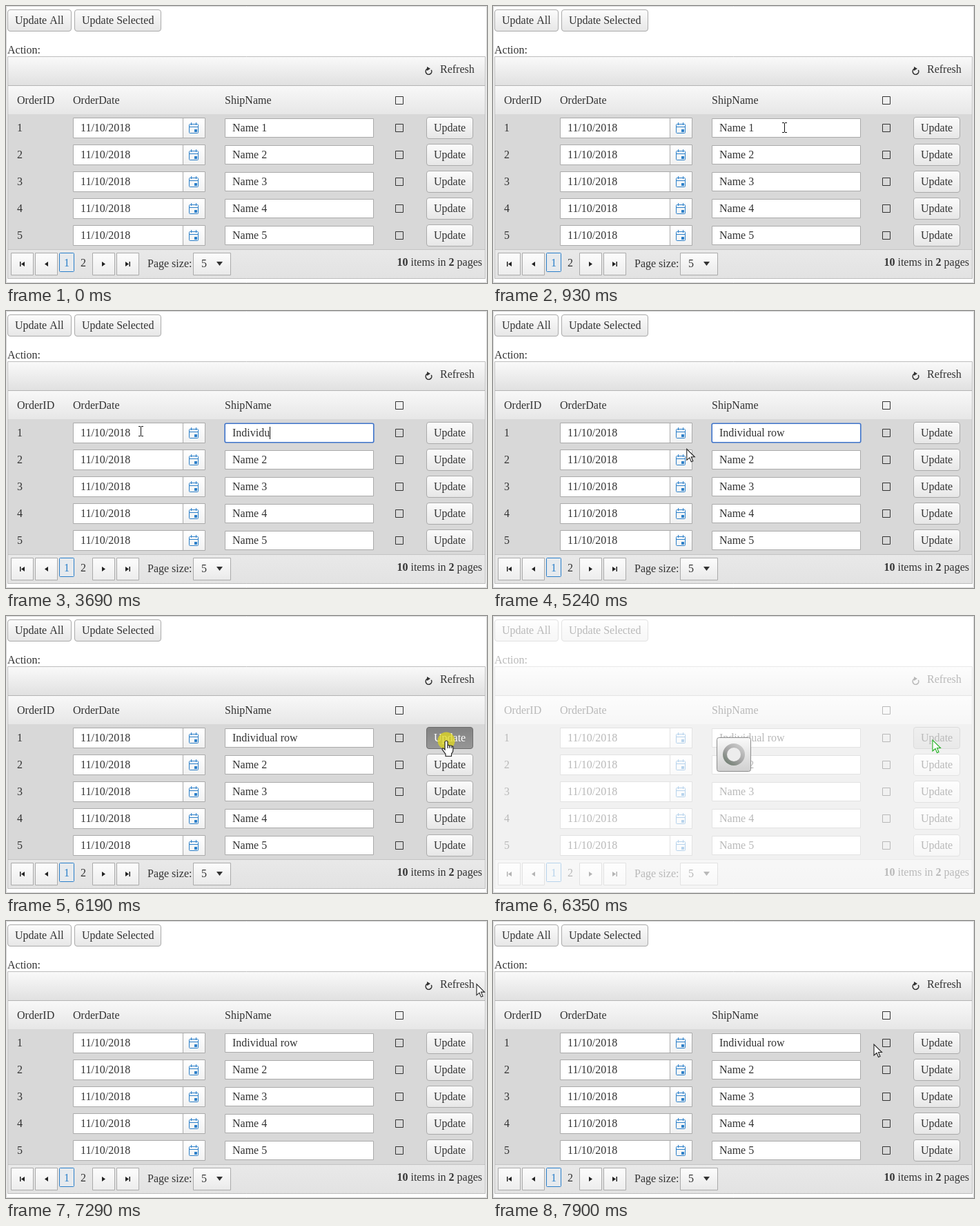
Recreate the animation shown at these times as an HTML page with a canvas. Size 697 by 402 pixels, loop 8000 ms.

```html
<!DOCTYPE html>
<html lang="en">
<head>
<meta charset="utf-8">
<title>Order grid</title>
<style>
html, body { margin: 0; width: 100%; height: 100%; overflow: hidden; background: #fff; }
canvas { display: block; width: 697px; height: 402px; }
</style>
</head>
<body>
<canvas id="stage" width="697" height="402"></canvas>
<script>
const ctx = document.getElementById('stage').getContext('2d');
const LOOP = 8000;
const INK = '#333', LINE = '#aaa', BLUE = '#2b7fc9';
const FONT = '16px "Liberation Serif", "Times New Roman", serif';
const ROW_H = 39, ROW_Y = 177;
const PHRASE = 'Individual row';

// Pointer moves: start, step length, step count, cubic path
const MOVES = [
  [140, 157, 7, [560, 402, 540, 300, 440, 150, 418, 179]],
  [1380, 160, 2, [418, 179, 340, 180, 270, 180, 194, 180]],
  [1690, 150, 1, [194, 180, 194, 178, 195, 176, 195, 174]],
  [5090, 158, 7, [195, 174, 330, 235, 520, 205, 638, 181]],
  [6960, 157, 7, [638, 181, 750, 80, 640, 20, 552, 179]]
];
const KEYS = [[2480, 152, 7], [3540, 150, 4], [4330, 150, 3]];

function stepsDone(t, start, gap, count) {
  return Math.max(0, Math.min(count, Math.floor((t - start + 8) / gap) + 1));
}

function pointer(t) {
  let pos = null;
  for (const [start, gap, count, p] of MOVES) {
    const k = stepsDone(t, start, gap, count);
    if (!k) break;
    const s = k / count, u = s * s * (3 - 2 * s), v = 1 - u;
    const at = i => v * v * v * p[i] + 3 * v * v * u * p[i + 2] + 3 * v * u * u * p[i + 4] + u * u * u * p[i + 6];
    pos = { x: at(0), y: at(1) };
  }
  return pos;
}

function typedText(t) {
  const n = KEYS.reduce((sum, k) => sum + stepsDone(t, ...k), 0);
  if (!n) return 'Name 1';
  return PHRASE.slice(0, n < 11 ? n - 1 : n);
}

function inside(p, x, y, w, h) {
  return p && p.x >= x && p.x < x + w && p.y >= y && p.y < y + h;
}

function text(s, x, y, color = INK, font = FONT) {
  ctx.font = font;
  ctx.fillStyle = color;
  ctx.fillText(s, x, y);
}

function fade(y, h, top, bottom) {
  const g = ctx.createLinearGradient(0, y, 0, y + h);
  g.addColorStop(0, top);
  g.addColorStop(1, bottom);
  return g;
}

function box(x, y, w, h, fill, stroke = LINE, r = 0) {
  ctx.beginPath();
  ctx.roundRect(x + .5, y + .5, w - 1, h - 1, r);
  if (fill) { ctx.fillStyle = fill; ctx.fill(); }
  ctx.lineWidth = 1;
  ctx.strokeStyle = stroke;
  ctx.stroke();
}

function rect(x, y, w, h, fill) {
  ctx.fillStyle = fill;
  ctx.fillRect(x, y, w, h);
}

function poly(points, fill, stroke, width = 1) {
  ctx.beginPath();
  for (let i = 0; i < points.length; i += 2) ctx.lineTo(points[i], points[i + 1]);
  ctx.closePath();
  ctx.fillStyle = fill;
  ctx.fill();
  if (stroke) {
    ctx.lineWidth = width;
    ctx.strokeStyle = stroke;
    ctx.stroke();
  }
}

function disc(x, y, r, fill) {
  ctx.beginPath();
  ctx.arc(x, y, r, 0, 7);
  ctx.fillStyle = fill;
  ctx.fill();
}

const LOOKS = {
  normal: ['#fcfcfc', '#e6e6e6', LINE, INK],
  hover: ['#d2d2d2', '#bebebe', '#999', INK],
  down: ['#828282', '#979797', '#6c6c6c', '#fff']
};

function button(label, x, y, w, look = 'normal') {
  const [top, bottom, edge, ink] = LOOKS[look];
  box(x, y, w, 32, fade(y, 32, top, bottom), edge, 3.5);
  text(label, x + 11, y + 21, ink);
}

function checkbox(y) {
  box(564, y - 6, 12, 12, null, '#333');
}

function calendar(x, y) {
  box(x, y + 2, 14, 14, null, BLUE, 1);
  rect(x, y + 6, 14, 1, BLUE);
  rect(x + 3, y, 1, 4, BLUE);
  rect(x + 10, y, 1, 4, BLUE);
  rect(x + 8, y + 10, 4, 4, BLUE);
}

function refreshIcon() {
  ctx.beginPath();
  ctx.arc(612.5, 95, 4.3, -.5, 4.2);
  ctx.lineWidth = 1.6;
  ctx.strokeStyle = INK;
  ctx.stroke();
  poly([610, 88, 615, 91, 610, 94], INK);
}

function pager() {
  rect(3, 353, 692, 43, fade(353, 43, '#e9e9e9', '#e2e2e2'));
  rect(3, 353, 692, 1, '#c4c4c4');
  for (const x of [7, 42, 125, 160]) box(x, 358, 33, 33, fade(358, 33, '#fdfdfd', '#ececec'), LINE);
  rect(20, 371, 1.5, 7, '#222');
  poly([27, 371, 27, 378, 22, 374.5], '#222');
  poly([61, 371, 61, 378, 56, 374.5], '#222');
  poly([139, 371, 139, 378, 144, 374.5], '#222');
  poly([173, 371, 173, 378, 178, 374.5], '#222');
  rect(178.5, 371, 1.5, 7, '#222');
  box(77, 358, 22, 28, '#e6eaee', BLUE, 1);
  text('1', 84, 378, BLUE);
  text('2', 108, 378);
  text('Page size:', 205, 379);
  box(271, 358, 55, 33, fade(358, 33, '#fdfdfd', '#e9e9e9'), LINE);
  text('5', 283, 379);
  poly([305, 371, 314, 371, 309.5, 377], INK);

  const bold = 'bold ' + FONT;
  const parts = [['10', bold], [' items in ', FONT], ['2', bold], [' pages', FONT]];
  const widths = parts.map(([s, f]) => (ctx.font = f, ctx.measureText(s).width));
  let x = 690 - widths.reduce((a, b) => a + b);
  parts.forEach(([s, f], i) => { text(s, x, 377, INK, f); x += widths[i]; });
}

function nameField(t, value, y, focused) {
  box(317, y - 14, 216, 28, '#fff', LINE);
  if (focused) {
    ctx.beginPath();
    ctx.roundRect(317.2, y - 13.8, 215.6, 27.6, 2);
    ctx.lineWidth = 1.6;
    ctx.strokeStyle = '#3f74cb';
    ctx.stroke();
  }
  ctx.font = FONT;
  const w = ctx.measureText(value).width;
  const selected = focused && t >= 1372 && t < 2472;
  if (selected) rect(328, y - 9, w, 18, '#3297fd');
  text(value, 328, y + 5, selected ? '#fff' : INK);
  const blinkOn = t < 4630 || (t - 4630) % 1060 < 530;
  if (focused && !selected && blinkOn) rect(Math.round(328 + w), y - 9, 1, 18, '#111');
}

function row(i, t, p) {
  const y = ROW_Y + i * ROW_H;
  text(String(i + 1), 16, y + 5);
  box(97, y - 15, 192, 30, '#fff', LINE);
  rect(257, y - 14, 31, 28, fade(y - 14, 28, '#fff', '#f1f1f1'));
  rect(256, y - 14, 1, 28, LINE);
  text('11/10/2018', 108, y + 5);
  calendar(265, y - 8);
  const focused = i === 0 && t >= 1222 && t < 6182;
  nameField(t, i ? 'Name ' + (i + 1) : typedText(t), y, focused);
  checkbox(y);
  let look = inside(p, 609, y - 16, 68, 32) ? 'hover' : 'normal';
  if (i === 0 && t >= 6182 && t < 6342) look = 'down';
  button('Update', 609, y - 16, 68, look);
}

function page(t, p) {
  rect(0, 0, 697, 402, '#fff');
  button('Update All', 2, 5, 93);
  button('Update Selected', 99, 5, 126);
  text('Action:', 2, 69);

  rect(2, 73, 693, 43, fade(73, 43, '#fafafa', '#e0e0e0'));
  refreshIcon();
  text('Refresh', 629, 97);
  rect(2, 116, 693, 41, fade(116, 41, '#f8f8f8', '#e7e7e7'));
  rect(2, 115, 693, 1, '#b4b4b4');
  text('OrderID', 16, 142);
  text('OrderDate', 97, 142);
  text('ShipName', 317, 142);
  checkbox(137);

  rect(2, 157, 693, 196, '#d8d8d8');
  for (let i = 0; i < 5; i++) row(i, t, p);
  pager();
  box(2, 73, 693, 323, null, '#bdbdbd');
}

function loader() {
  rect(1, 1, 695, 400, 'rgba(255,255,255,.66)');
  box(324, 176, 50, 50, fade(176, 50, '#fafafa', '#cfcfcf'), '#8c8c8c', 3);
  const ring = ctx.createLinearGradient(338, 215, 360, 187);
  ring.addColorStop(0, '#6f7d70');
  ring.addColorStop(.45, '#a3a3a3');
  ring.addColorStop(1, '#cdcdcd');
  disc(349, 201, 16, ring);
  disc(349, 201, 10, '#ededed');
}

function arrow(x, y, edge) {
  poly([x, y, x, y + 16, x + 4, y + 12.5, x + 6.5, y + 18.5, x + 9, y + 17.5,
    x + 6.5, y + 11.5, x + 11.5, y + 11.5], '#fff', edge, 1.1);
}

function beam(x, y) {
  x = Math.round(x);
  y = Math.round(y);
  rect(x, y - 6, 1, 13, '#111');
  for (const dy of [-7, 7]) {
    rect(x - 3, y + dy, 3, 1, '#111');
    rect(x + 1, y + dy, 3, 1, '#111');
  }
}

function hand(x, y) {
  ctx.save();
  ctx.translate(x, y);
  ctx.beginPath();
  ctx.moveTo(-2, 13);
  ctx.lineTo(-2, 1.5);
  ctx.quadraticCurveTo(0, -1.5, 2, 1.5);
  ctx.lineTo(2, 7);
  for (const k of [5, 8]) ctx.quadraticCurveTo(k - 1.5, 5.5, k, 8);
  ctx.quadraticCurveTo(10.5, 7.5, 10, 11);
  ctx.lineTo(9.5, 16);
  ctx.lineTo(7.5, 19);
  ctx.lineTo(7.5, 22.5);
  ctx.lineTo(-1, 22.5);
  ctx.lineTo(-1, 19.5);
  ctx.lineTo(-6, 12.5);
  ctx.quadraticCurveTo(-5.5, 9, -2, 13);
  ctx.closePath();
  ctx.fillStyle = '#fff';
  ctx.fill();
  ctx.lineWidth = 1.2;
  ctx.strokeStyle = '#222';
  ctx.stroke();
  for (const k of [2, 5, 8]) {
    ctx.beginPath();
    ctx.moveTo(k, 7.5);
    ctx.lineTo(k, 11);
    ctx.stroke();
  }
  ctx.restore();
}

function cursor(t, p) {
  const busy = t >= 6342 && t < 6492;
  const pressed = (t >= 1222 && t < 1682) || (t >= 6182 && t < 6342);
  if (pressed) disc(p.x, p.y, 12.5, 'rgba(226,217,30,.75)');
  if (busy) return arrow(p.x - 1, p.y - 1, '#22b022');

  const rowY = (p.y - ROW_Y + ROW_H / 2) % ROW_H - ROW_H / 2;
  const inRows = p.y > 158 && p.y < 352;
  const over = (x, w, half) => inRows && Math.abs(rowY) < half && p.x >= x && p.x < x + w;
  if (over(609, 68, 16) || over(257, 32, 15) || inside(p, 605, 82, 75, 22)) hand(p.x, p.y);
  else if (t < 1682 && t >= 1222 || over(97, 159, 15) || over(317, 216, 14)) beam(p.x, p.y);
  else arrow(p.x, p.y, '#222');
}

function draw(t) {
  const p = pointer(t);
  page(t, p);
  if (t >= 6342 && t < 6492) loader();
  if (p) cursor(t, p);
  box(0, 0, 697, 402, null, '#d6d6d6');
}

const begin = performance.now();
function tick() {
  draw((performance.now() - begin) % LOOP);
  requestAnimationFrame(tick);
}
tick();
</script>
</body>
</html>
```
